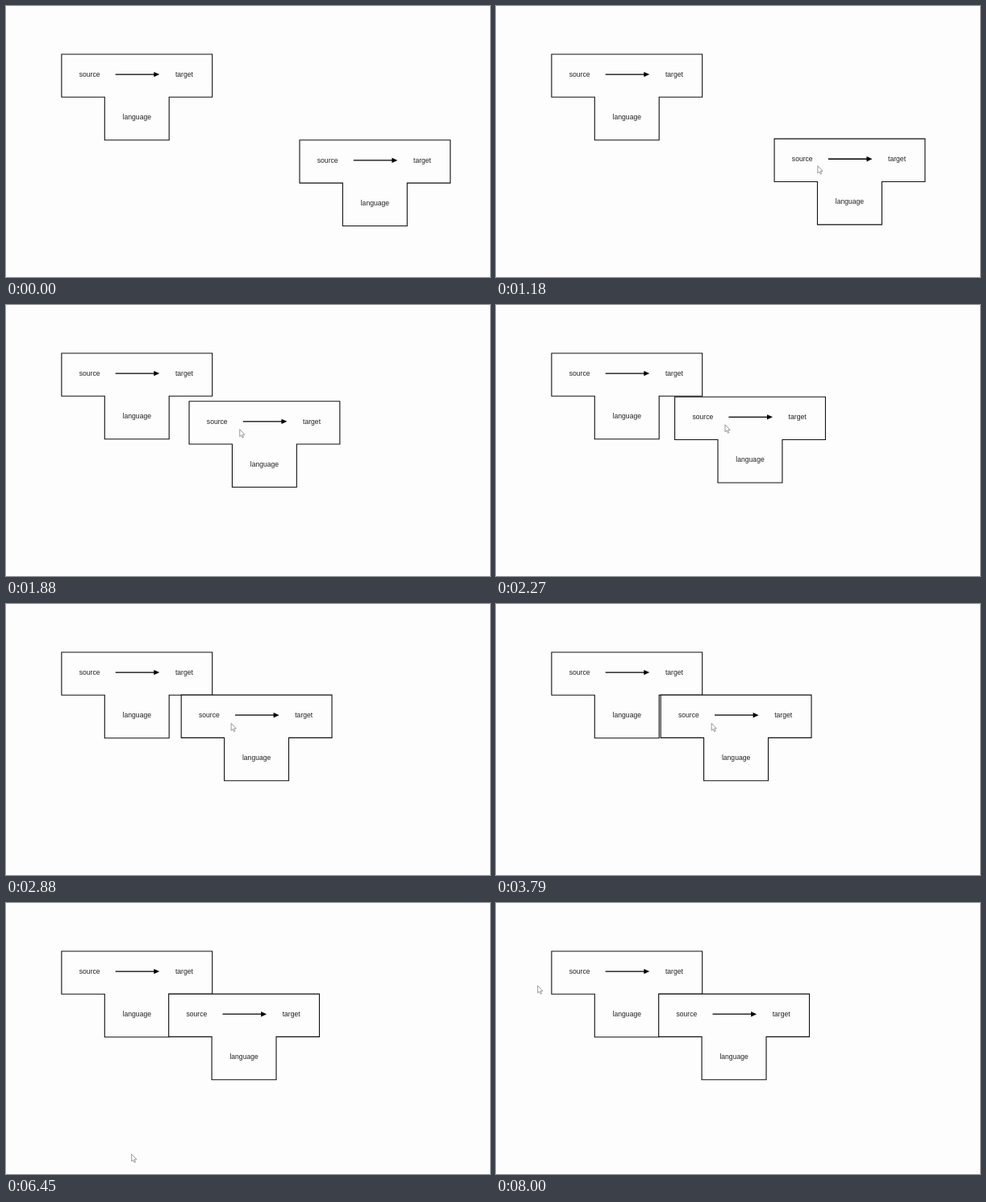
Animation of 600x337 px, one loop 8030 ms. Source, as an HTML page:

```html
<!DOCTYPE html>
<html lang="en">
<head>
<meta charset="utf-8">
<style>
  html, body { margin: 0; height: 100%; overflow: hidden; background: #fefdfe; }
  svg { display: block; width: 600px; height: 337px; }
  text { font: 8.6px "Liberation Sans", Arial, sans-serif; text-anchor: middle; fill: #222; }
</style>
</head>
<body>
<svg viewBox="0 0 600 337">
  <defs>
    <g id="diagram">
      <path d="M0 0H186.8V53.3H133.3V106.7H53.4V53.3H0Z" fill="#fefdfe" stroke="#111" stroke-width="1.1"/>
      <path d="M66.8 25.1H116" stroke="#000" stroke-width="1.3"/>
      <path d="M114.4 21.9L121.4 25.1L114.4 28.3Z"/>
      <text x="34.7" y="27.8">source</text>
      <text x="152" y="27.8">target</text>
      <text x="93.4" y="81.2">language</text>
    </g>
  </defs>
  <use href="#diagram" x="68.9" y="60"/>
  <use href="#diagram" id="dragged"/>
  <path id="cursor" d="M0 0V9L2 7.2L3.4 10.4L4.8 9.8L3.5 6.6H6.2Z" fill="#fff" stroke="#808080" stroke-width=".8"/>
</svg>
<script>
const LOOP = 8030, CURSOR_ENTERS = 205;
const CURSOR_LEAD = 50; // the dragged shape trails the pointer by this many ms
const dragged = document.getElementById('dragged');
const cursor = document.getElementById('cursor');

// How far a move has come at time t, eased in and out
function progress(t, start, end) {
  const k = Math.min(1, Math.max(0, (t - start) / (end - start)));
  return k * k * (3 - 2 * k);
}

// Sum of eased moves: [start ms, end ms, dx, dy]
function travel(moves, t) {
  return moves.reduce(([x, y], [start, end, dx, dy]) => {
    const p = progress(t, start, end);
    return [x + dx * p, y + dy * p];
  }, [0, 0]);
}

// One long swing that lifts late, then small nudges to the left
function dragOffset(t) {
  const swing = progress(t, 980, 1840);
  const [x, y] = travel([
    [1850, 2420, -6.6, -6.7],
    [2610, 3390, -11.8, 0],
    [3410, 3790, -4.5, 0],
    [4650, 5260, -1.6, 0],
    [5700, 5800, -0.9, 0]
  ], t);
  return [x - 136.9 * swing, y - 47 * swing ** 1.7];
}

function cursorPosition(t) {
  const [dragX, dragY] = dragOffset(t + CURSOR_LEAD);
  const [x, y] = travel([
    [180, 1000, -13, -135],
    [5970, 6450, -109, 164],
    [7330, 7600, -96, -297],
    [7600, 7740, -42, 85],
    [7880, 8000, 34, 2.5]
  ], t);
  return [440 + x + dragX, 337 + y + dragY];
}

function place(element, [x, y]) {
  element.setAttribute('transform', `translate(${x} ${y})`);
}

function draw(now) {
  const t = now % LOOP;
  const [dx, dy] = dragOffset(t);
  place(dragged, [364 + dx, 166.8 + dy]);
  place(cursor, cursorPosition(t));
  cursor.style.visibility = t < CURSOR_ENTERS ? 'hidden' : 'visible';
  requestAnimationFrame(draw);
}
draw(0);
</script>
</body>
</html>
```
